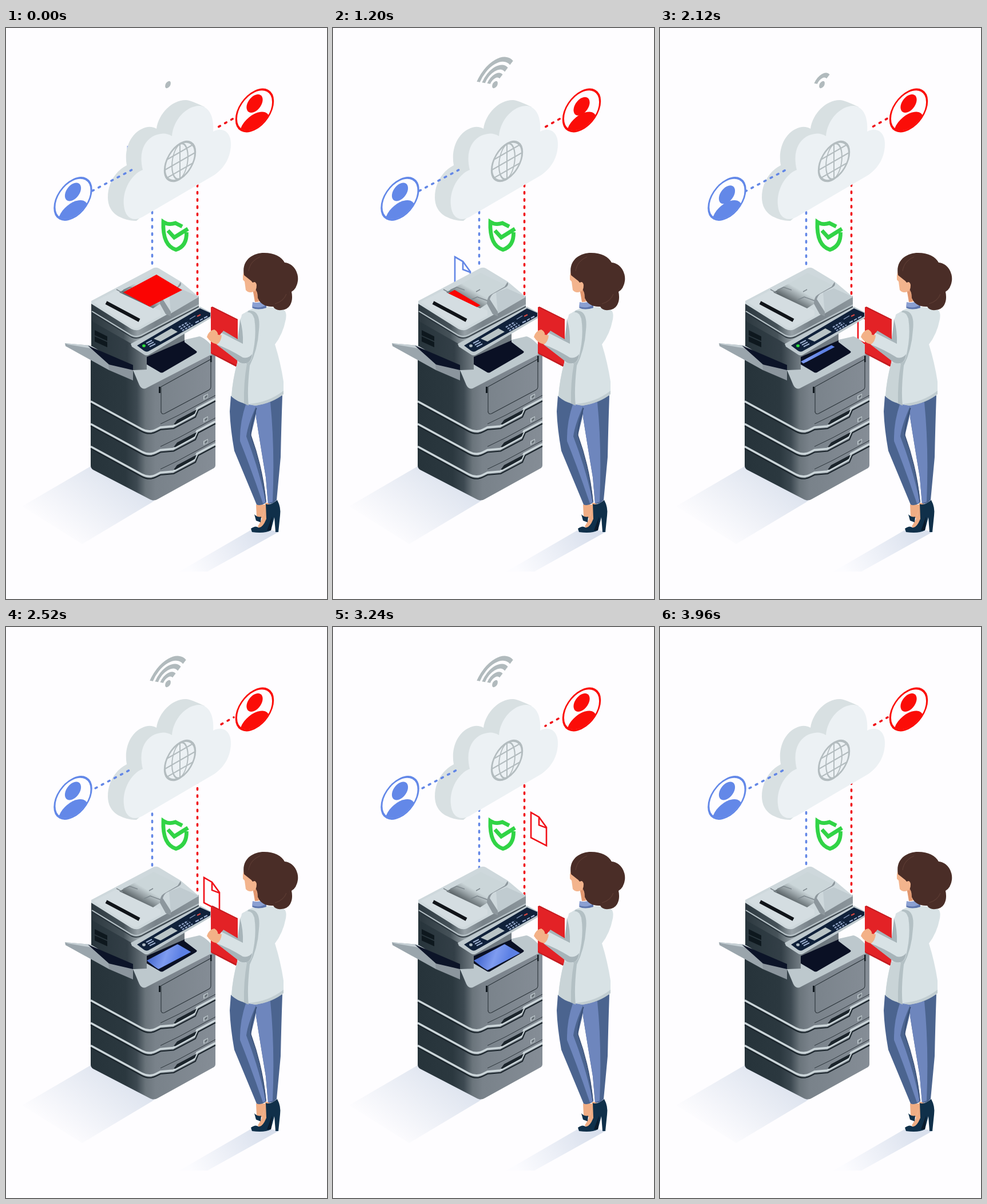
Write an HTML page that moves like this. It is 561 px wide and 998 px high and loops after 4000 ms.

```html
<!DOCTYPE html>
<html lang="en">
<head>
<meta charset="utf-8">
<title>Cloud printing</title>
<style>
html, body { margin: 0; width: 100%; height: 100%; overflow: hidden; background: #fefdff; }
svg { display: block; width: 100%; height: 100%; }
.line { fill: none; }
.dash { fill: none; stroke-width: 3.6; stroke-linecap: round; stroke-dasharray: 3 9.57; }
.blue { stroke: #6387e6; }
.red { stroke: #f01018; }
.wifi { fill: none; stroke: #b1babd; stroke-width: 7.4; }
</style>
</head>
<body>
<svg viewBox="0 0 561 998" preserveAspectRatio="none">
<defs>
  <linearGradient id="floorA" gradientUnits="userSpaceOnUse" x1="205" y1="765" x2="108" y2="900">
    <stop stop-color="#dae1ed"/><stop offset="1" stop-color="#fefdff"/>
  </linearGradient>
  <linearGradient id="floorB" gradientUnits="userSpaceOnUse" x1="450" y1="872" x2="325" y2="952">
    <stop stop-color="#d9e0ed"/><stop offset="1" stop-color="#fcfcff"/>
  </linearGradient>
  <linearGradient id="body" gradientUnits="userSpaceOnUse" x1="148" y1="0" x2="366" y2="0">
    <stop stop-color="#26333a"/><stop offset=".28" stop-color="#2b383f"/>
    <stop offset=".37" stop-color="#3d4951"/><stop offset=".44" stop-color="#6a747b"/>
    <stop offset=".52" stop-color="#79828a"/><stop offset="1" stop-color="#858d96"/>
  </linearGradient>
  <linearGradient id="head" gradientUnits="userSpaceOnUse" x1="149" y1="0" x2="337" y2="0">
    <stop stop-color="#2c383f"/><stop offset=".3" stop-color="#465259"/>
    <stop offset=".43" stop-color="#96a0a6"/><stop offset=".6" stop-color="#788289"/>
    <stop offset="1" stop-color="#8c969c"/>
  </linearGradient>
  <linearGradient id="neck" gradientUnits="userSpaceOnUse" x1="149" y1="0" x2="246" y2="0">
    <stop stop-color="#27343b"/><stop offset=".65" stop-color="#333f47"/><stop offset="1" stop-color="#747e85"/>
  </linearGradient>
  <linearGradient id="trough" gradientUnits="userSpaceOnUse" x1="228" y1="477" x2="246" y2="446">
    <stop stop-color="#5f686c"/><stop offset=".35" stop-color="#98a2a6"/><stop offset=".7" stop-color="#cbd6d9"/>
  </linearGradient>
  <linearGradient id="sheet" gradientUnits="userSpaceOnUse" x1="260" y1="570" x2="305" y2="585">
    <stop stop-color="#4e70d4"/><stop offset=".5" stop-color="#7f9cf0"/><stop offset="1" stop-color="#5c80e4"/>
  </linearGradient>
  <clipPath id="disc"><circle r="33"/></clipPath>
  <clipPath id="feed"><path d="M200 463L262 425L325 450L256 490Z"/></clipPath>
  <clipPath id="exit"><path d="M246 583L306 551L334 568L272 603Z"/></clipPath>
  <g id="doc" class="line" stroke-width="2.6">
    <path d="M0 0L14 8L27 26V58L0 44Z"/><path d="M14 8V22L27 27"/>
  </g>
</defs>

<path fill="url(#floorA)" d="M28 836L148 766L260 826L133 902Z"/>
<path fill="url(#floorB)" d="M303 950L434 874L478 880L352 950Z"/>

<use id="blueDoc" href="#doc" class="blue"/>
<use id="redDoc" href="#doc" class="red"/>
<path id="blueDown" class="dash blue" d="M255.5 300V421"/>
<path id="redUp" class="dash red" d="M334.5 467V270"/>

<g id="cloud">
  <path fill="#d8e0e2" d="M178 296C178 272 190 251 211 240C205 207 222 177 248 173Q256 172 263 176C267 148 292 125 315 126Q322 126 347 138L330 250L228 337Q214 338 196 329Q178 318 178 296Z"/>
  <path fill="#ecf1f4" d="M206 310C203 285 218 256 239 248C231 216 243 194 262 187Q278 181 290 189C292 161 315 136 338 136C356 137 364 157 362 181C379 172 394 182 393 205C392 228 381 245 364 257L239 330C223 339 208 333 206 310Z"/>
  <g class="line" stroke="#b3bcbf" stroke-width="2.3" transform="matrix(.87 -.5 0 1 304 233)">
    <circle r="30.6" stroke-width="3.6"/><ellipse rx="16" ry="30"/>
    <path d="M0-30V30M-30 0H30M-25-16H25M-25 16H25"/>
  </g>
</g>
<path id="blueIn" class="dash blue" d="M149.5 285.3L219.5 248.2"/>
<path id="redOut" class="dash red" d="M371 173L398 157.8"/>

<g id="signal" transform="matrix(.87 -.5 0 1 283 99)"><circle r="5.6" fill="#b1babd"/></g>
<g id="users"></g>

<g class="line" stroke="#31d446" stroke-width="6.8">
  <path d="M308 347L296 341Q284 345 275 339C274 363 279 382 297 387.5C311 383 316 372 315.5 357"/>
  <path d="M283 354L294 366L318 351"/>
</g>

<g id="printer">
  <path fill="url(#body)" d="M148 573L226 600L338 541L366 568V764Q366 768 362 770L266 823Q258 828 250 823L152 772Q148 769 148 765Z"/>
  <path fill="#bdc8cd" d="M222 598L246 584L312 545L338 539Q348 541 365 561L364 568L244 630Q237 632 233 624Z"/>
  <path fill="#0a1024" d="M244 566L312 541V549L333 565Q335 567 331 569L276 601Q272 604 268 601L246 588Z"/>
  <g clip-path="url(#exit)"><path id="output" fill="url(#sheet)" d="M214 567L270 537L327 570L270 600Z"/></g>
  <g class="line" stroke="#2b343a" stroke-width="1.1">
    <path d="M271 672V627L358 579V627Q358 631 354 633L277 674Q271 676 271 669Z"/>
  </g>
  <path fill="#11191f" d="M267 627h3v11h-3zM357 573h2.5v11h-2.5z"/>
  <g id="drawers"></g>

  <path fill="url(#neck)" d="M149 500L226 546L246 563V597L222 598L149 556Z"/>
  <path fill="#6f7980" d="M230 558L312 530V546L246 575Z"/>
  <path fill="#0e181e" d="M155 528L177 539V547L155 537ZM155 539L177 549V558L155 548Z"/>

  <path fill="#9aa5ac" d="M103 551L148 555L184 589L180 598L104 556Z"/>
  <path fill="#c6d0d5" d="M103 551L148 555L160 562L108 553Z"/>
  <path fill="#0c1428" d="M143 555L222 589V599L182 590Z"/>
  <path fill="#8b959d" d="M179 588L222 598V616L180 598Z"/>

  <path fill="url(#head)" d="M149 478L227 526L337 468V499L237 553Q227 556 216 550L153 514Q149 511 149 506Z"/>
  <path class="line" stroke="#b8c3c8" stroke-width="2" d="M150 495L219 537Q227 541 236 537L337 484"/>
  <path class="line" stroke="#263139" stroke-width="1.4" d="M150 498L219 540Q227 544 236 540L337 487"/>

  <path fill="#ced8dc" d="M149 477L255 421Q261 417 267 420L305 443L337 470L234 527Q227 530 219 526L149 482Z"/>
  <path fill="#c0cbd0" d="M285 462L304 455L337 470L288 499Z"/>
  <path fill="#d4dde1" d="M153 479L196 457L257 488L270 494V503L230 524Q226 526 221 523Z"/>
  <path fill="url(#trough)" d="M198 462L258 428L301 449L274 469L271 481L257 490Z"/>
  <path class="line" stroke="#7e888e" stroke-width="1.6" d="M193 457L204 463M205 458L216 453L230 458M241 475L252 470L271 477M250 461L257 457"/>
  <path fill="#8d979d" d="M305 444Q308 449 302 453L283 463Q276 466 274 474L288 496V504L279 500L269 482Q269 470 276 466L300 452Z"/>
  <g clip-path="url(#feed)"><path id="paper" fill="#fb0402" d="M205 462L263 431L308 458L251 487Z"/></g>
  <path class="line" stroke="#101419" stroke-width="6" d="M175 480L233 511"/>

  <path fill="#bec9ce" d="M218 552L339 487L358 497V507L250 571Q245 574 240 570L220 557Z"/>
  <path fill="#10213a" d="M229 555L339 490L357 498V504L249 565Q245 567 241 564Z"/>
  <path fill="#b9c4c6" d="M258 543L289 525L300 531L270 548Z"/>
  <path class="line" stroke="#9fb2d2" stroke-width="2" d="M245 551L255 546M248 554L258 549M251 557L261 552M331 515L337 512M339 511L344 508M346 507L352 504"/>
  <path class="line" stroke="#8fa2c4" stroke-width="2.4" stroke-dasharray="4 2" d="M302 523L318 514M305 526L322 516M308 529L326 519"/>
  <path class="line" stroke="#d54640" stroke-width="2.4" d="M334 504L340 501"/>
  <path class="line" stroke="#8fa2c4" stroke-width="1.4" d="M321 509L331 503"/>
  <ellipse id="led" cx="241" cy="555.5" rx="2.9" ry="2.4"/>
</g>

<g id="woman">
  <path fill="#c51b20" d="M358 488L361 487L405 509V588L402 592L358 569Z"/>
  <path fill="#e32226" d="M358 488L405 511V590L358 567Z"/>
  <path fill="#f0ad84" d="M437 833H454L448 857L438 854ZM453 830H461L459 856L444 876L440 871Q452 855 453 830Z"/>
  <path fill="#10304a" d="M434 850Q440 856 446 854L445 864L437 861ZM428 875Q436 869 441 873Q448 875 455 858L454 832Q462 835 474 825Q481 838 479 852L476 881H471L469 855L463 878Q452 884 430 881Z"/>
  <path fill="#0a1a2b" d="M465 854L463 878L456 878Z"/>
  <path fill="#4b648f" d="M393 643L441 658L428 712Q450 778 455 829Q446 836 438 833L399 739Q392 700 391 670ZM437 655L483 642Q481 700 480 750L473 825Q466 833 458 831L454 785Q444 725 437 680Z"/>
  <path fill="#6e86bd" d="M420 655L438 659Q422 695 420 714Q443 774 454 829L449 831Q430 775 409 722Q408 690 420 655ZM437 658L462 654Q470 735 466 828L458 831L454 785Q444 725 437 680Z"/>
  <path class="line" stroke="#34496f" stroke-width="1.2" d="M438 664Q427 695 428 712Q449 770 454 828"/>

  <path fill="#d8e2e5" d="M425 493Q440 485 465 488L486 493Q491 497 489 509Q484 535 470 553Q480 585 485 618V640Q465 655 436 660Q410 657 394 644Q396 615 404 586L409 510Q412 500 425 493Z"/>
  <path fill="#b3c0c4" d="M424 494Q446 492 442 528Q440 562 426 590Q421 635 424 660L415 656Q414 615 420 586L412 510Z"/>
  <path fill="#c9d4d7" d="M404 585L421 587Q415 620 416 656Q404 653 394 644Q396 615 404 585Z"/>
  <path fill="#c1cdd1" d="M424 657Q458 655 485 634V640Q465 656 436 660Z"/>
  <path fill="#d8e2e5" d="M412 501Q428 490 434 508Q439 540 429 578Q424 590 409 584L368 553Q371 536 379 531L405 546Z"/>
  <path fill="#a7b4b9" d="M409 509Q415 530 414 552L377 533L380 529L405 544ZM368 553Q390 561 414 576Q424 578 430 570Q428 591 409 585Z"/>
  <path fill="#f3b187" d="M351 540Q354 529 364 527Q371 531 370 536L377 537Q376 548 369 553Q358 551 351 540Z"/>

  <path fill="#f3b48d" d="M417 419L414 433L414 440L417 443L419 458Q424 464 432 461L437 479L452 477L446 426Z"/>
  <path fill="#e1966e" d="M432 461L436 453L441 478L435 479Z"/>
  <path fill="#8ba0d2" d="M431 479Q443 482 454 475L455 489Q440 494 430 487Z"/>
  <path fill="#5d75ac" d="M431 487Q444 491 455 484V489Q440 494 430 489Z"/>
  <path fill="#4a2d27" d="M416 432C411 406 431 393 451 393C469 393 482 400 487 410C502 411 512 427 510 442Q508 456 499 461C503 480 495 493 481 493Q471 494 467 487Q447 488 440 472Q440 460 434 454Q433 444 426 440Q421 436 416 432Z"/>
  <path fill="#f3b48d" d="M430 446Q436 441 438 449Q438 459 433 461Z"/>
  <path class="line" stroke="#5c3b33" stroke-width="1.2" d="M424 425Q426 408 444 400M470 482Q485 478 490 465"/>
</g>
</svg>
<script>
const LOOP = 4000, FRAME = 40, PITCH = 12.57;
const $ = id => document.getElementById(id);
const clamp = x => Math.min(1, Math.max(0, x));
const show = (el, on) => el.style.visibility = on ? "visible" : "hidden";
const move = (el, x, y) => el.setAttribute("transform", `translate(${x} ${y})`);

const arcs = [14.8, 27.2, 39.6].map(r => {
  const x = r * Math.sin(1), y = -r * Math.cos(1);
  return `<path class="wifi" d="M${-x} ${y}A${r} ${r} 0 0 1 ${x} ${y}"/>`;
});
$("signal").innerHTML += arcs.join("");
const bars = [...$("signal").children];

const user = (x, y, color) => `
  <g transform="matrix(.94 -.45 0 .97 ${x} ${y})" fill="${color}">
    <circle r="34.2" fill="#fefdff" stroke="${color}" stroke-width="3.4"/>
    <g clip-path="url(#disc)"><ellipse cy="28" rx="27.5" ry="22"/></g>
    <circle class="face" cy="-12.4" r="15"/>
  </g>`;
$("users").innerHTML = user(117, 298.5, "#6388e8") + user(434.5, 144, "#fb0d08");
const [blueFace, redFace] = document.querySelectorAll(".face");

const drawer = y => `
  <g class="line" transform="translate(0 ${y})">
    <path stroke="#1c262d" stroke-width="2" d="M148 656L237 705Q250 712 262 706L270 702L293 700L331 680L336 668L366 652"/>
    <path stroke="#cbd5d9" stroke-width="3.6" d="M148 652.5L237 701Q250 708 262 702L270 698L292 696L329 676L334 665L366 648"/>
    <path fill="#1b242b" d="M293 693L299 685L333 667L330 674L327 676L296 693Z"/>
    <path stroke="#2c353b" d="M270 692L297 679L303 676L366 642"/>
    <path fill="#b7c1c6" d="M345 643L353 639V646L345 650Z"/>
    <path fill="#6b747b" d="M347 644L352 641V645L347 648Z"/>
  </g>`;
$("drawers").innerHTML = [0, 39.5, 79].map(drawer).join("");

// id, distance of the first dash from the path start, time per dash pitch
const flows = [["blueDown", 8.4, 300], ["redUp", 1.5, 300], ["blueIn", 1.3, 240], ["redOut", .8, 300]];

const dip = (t, from, to) => t > from && t < to ? 5 * Math.sin(Math.PI * (t - from) / (to - from)) : 0;

function draw(t) {
  for (const [id, start, period] of flows)
    $(id).setAttribute("stroke-dashoffset", -(start + PITCH * (t / period % 1)));

  const beat = t % 2000;
  bars.forEach((bar, i) => show(bar, beat >= i * 80 && beat < 1960 - i * 80));

  move($("blueDoc"), 213, 208 + .16 * t);
  show($("blueDoc"), t < 1600);
  move($("redDoc"), 346, 381 - .158 * (t - 2880));
  show($("redDoc"), t >= 2040 && t < 3920);

  const fed = Math.max(0, t - 360) * .06;
  move($("paper"), -fed, fed * .53);
  show($("paper"), t < 1440);

  const out = 1 - clamp((t - 2000) / 600);
  move($("output"), -27 * out, -15.5 * out);
  show($("output"), t >= 2000 && t < 3320);

  move(blueFace, 0, dip(t, 1780, 2460));
  move(redFace, 0, dip(t, 860, 1540));
  $("led").setAttribute("fill", t * 6 / LOOP % 1 < .5 ? "#2ee03c" : "#aebbc4");
}

const begin = performance.now();
function tick() {
  const t = Math.max(0, performance.now() - begin) % LOOP;
  draw(Math.floor(t / FRAME) * FRAME);
  requestAnimationFrame(tick);
}
tick();
</script>
</body>
</html>
```
